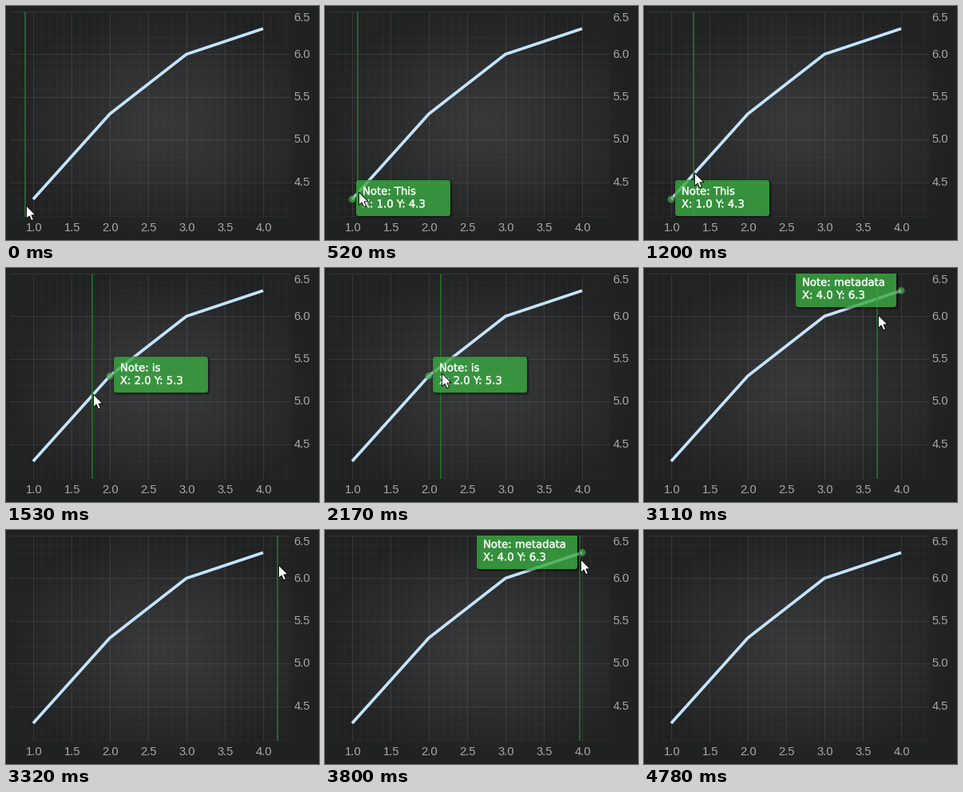
A matplotlib script that plays this animation: 392 by 293 pixels, repeating every 5.22 s.

```python
import numpy as np
import matplotlib.pyplot as plt
from matplotlib.animation import FuncAnimation
from matplotlib.patches import Circle, FancyBboxPatch, Polygon, Rectangle
from matplotlib.patheffects import withStroke

W, H, DPI = 392, 293, 64
LOOP, STEP = 5220, 20
PX = 72 / DPI  # points per pixel

LEFT, TOP, RIGHT, BOTTOM = 5, 7, 357, 265
UNIT_X, UNIT_Y = 96, 106.8
NOTES = [(1.0, 4.3, "This"), (2.0, 5.3, "is"),
         (3.0, 6.0, "some"), (4.0, 6.3, "metadata")]

# Mouse moves: first step (ms), last step (ms), steps, destination
START = (25, 249)
MOVES = [(340, 520, 4, (42, 232)),
         (1080, 1530, 8, (109, 157)),
         (1590, 1650, 2, (112, 154)),
         (2020, 2530, 8, (218, 81)),
         (2900, 3320, 7, (341, 43)),
         (3590, 3800, 4, (320, 36)),
         (4390, 4780, 7, (353, 302))]

ARROW = np.array([(0, 0), (0, 16.4), (3.7, 12.9), (6.2, 18.7),
                  (9.0, 17.5), (6.5, 11.9), (11.6, 11.7)])


def to_x(v):
    return 34 + (v - 1) * UNIT_X


def to_y(v):
    return 60.4 + (6 - v) * UNIT_Y


def ease(p):
    return p * p * (3 - 2 * p)


def mouse(t):
    pos = np.array(START, float)
    for first, last, steps, dest in MOVES:
        if t < first:
            break
        k = int((t - first) / (last - first) * (steps - 1) + 0.02)
        p = ease(min((k + 1) / steps, 1))
        pos = pos + (np.array(dest) - pos) * p
    return np.round(pos)


def backdrop():
    yy, xx = np.mgrid[0:H, 0:W] + 0.5
    r = np.hypot((xx - W / 2) / (W / 2), (yy - H / 2) / (H / 2))
    img = 55 - 23 * np.clip(r, 0, 1)
    bands = 1.5 * (((xx - to_x(1)) // (UNIT_X / 2) % 2 == 0).astype(float)
                   + ((yy - to_y(6)) // (UNIT_Y / 2) % 2 == 0))
    grid = np.zeros((H, W))
    for step, level in ((0.1, 6), (0.5, 20)):
        for v in np.arange(0, 5, step):
            x = int(round(to_x(v)))
            if LEFT <= x < RIGHT:
                grid[:, x] = np.maximum(grid[:, x], level)
        for v in np.arange(3, 6.51, step):
            y = int(round(to_y(v)))
            if TOP <= y < BOTTOM:
                grid[y] = np.maximum(grid[y], level)
    plot = np.s_[TOP:BOTTOM, LEFT:RIGHT]
    img[plot] += (bands + grid)[plot]
    return np.dstack([img, img + 0.7, img + 1.4]).round().astype(np.uint8)


fig = plt.figure(figsize=(W / DPI, H / DPI), dpi=DPI, facecolor="#202122")
ax = fig.add_axes([0, 0, 1, 1])
ax.imshow(backdrop(), extent=(0, W, H, 0), interpolation="nearest", aspect="auto")
ax.set(xlim=(0, W), ylim=(H, 0))
ax.axis("off")
plot_area = Rectangle((LEFT, TOP), RIGHT - LEFT, BOTTOM - TOP, transform=ax.transData)


def label(x, y, s, ha):
    ax.text(x, y, s, ha=ha, va="baseline", color="#a8a8a8",
            family="Liberation Sans", size=14.7 * PX)


for v in np.arange(1, 4.1, 0.5):
    label(to_x(v) + 1, 282.5, f"{v:.1f}", "center")
for v in np.arange(4.5, 6.6, 0.5):
    label(360.5, max(to_y(v) + 4.2, 19), f"{v:.1f}", "left")

points = [(to_x(x), to_y(y)) for x, y, _ in NOTES]
ax.plot(*zip(*points), color="#c3e4fd", lw=3.7 * PX, solid_capstyle="butt",
        solid_joinstyle="miter", zorder=3)

hair, = ax.plot([0, 0], [TOP, BOTTOM - 1], color="#23742c", lw=1.6 * PX,
                solid_capstyle="butt", zorder=4)
dot = Circle((0, 0), 4.2, fc=(0.29, 0.67, 0.32, 0.7), ec=(0.2, 0.5, 0.22, 0.5),
             lw=1.2 * PX, zorder=5)
ax.add_patch(dot)


def panel(z, **style):
    box = FancyBboxPatch((0, 0), 1, 1, boxstyle="round,pad=0,rounding_size=3",
                         zorder=z, **style)
    ax.add_patch(box)
    box.set_clip_path(plot_area)
    return box


shadows = [panel(6, fc="none", ec="black", lw=2 * PX, alpha=0.22) for _ in range(3)]
tip_box = panel(7, fc="#3aab42", alpha=0.8, lw=0)
INK = "#e8f5e8"
lines = [ax.text(0, 0, "", color=INK, family="DejaVu Sans", size=13.2 * PX,
                 va="baseline", zorder=8,
                 path_effects=[withStroke(linewidth=0.5 * PX, foreground=INK)])
         for _ in range(2)]
arrow = Polygon(ARROW, closed=True, fc="white", ec="black", lw=0.9 * PX,
                joinstyle="miter", zorder=10)
ax.add_patch(arrow)
tooltip = [dot, tip_box, *shadows, *lines]


def place_tooltip(i):
    x, y, word = NOTES[i]
    px, py = points[i]
    width = 126 if len(word) > 5 else 118
    left = round(px + 4.6)
    if left + width > RIGHT:
        left = round(px - 6.4) - width
    top = round(py - 24.2)
    dot.center = px, py
    tip_box.set_bounds(left, top, width, 45)
    for d, box in enumerate(shadows):
        box.set_bounds(left + d, top + d, width, 45)
    for k, s in enumerate((f"Note: {word}", f"X: {x:.1f} Y: {y:.1f}")):
        lines[k].set_text(s)
        lines[k].set_position((left + 8, top + 18.2 + 16 * k))


def draw(n):
    mx, my = mouse(n * STEP + STEP / 2)
    inside = LEFT <= mx < RIGHT and TOP <= my < BOTTOM
    hx = mx - 0.8
    hit = inside and points[0][0] <= hx <= points[-1][0]
    hair.set_xdata([hx, hx])
    hair.set_visible(inside)
    arrow.set_xy(ARROW + (mx + 0.5, my + 1))
    if hit:
        place_tooltip(int(round((hx - points[0][0]) / UNIT_X)))
    for part in tooltip:
        part.set_visible(hit)
    return [hair, arrow, *tooltip]


anim = FuncAnimation(fig, draw, frames=LOOP // STEP, interval=STEP,
                     repeat=True, blit=False)
plt.show()
```
